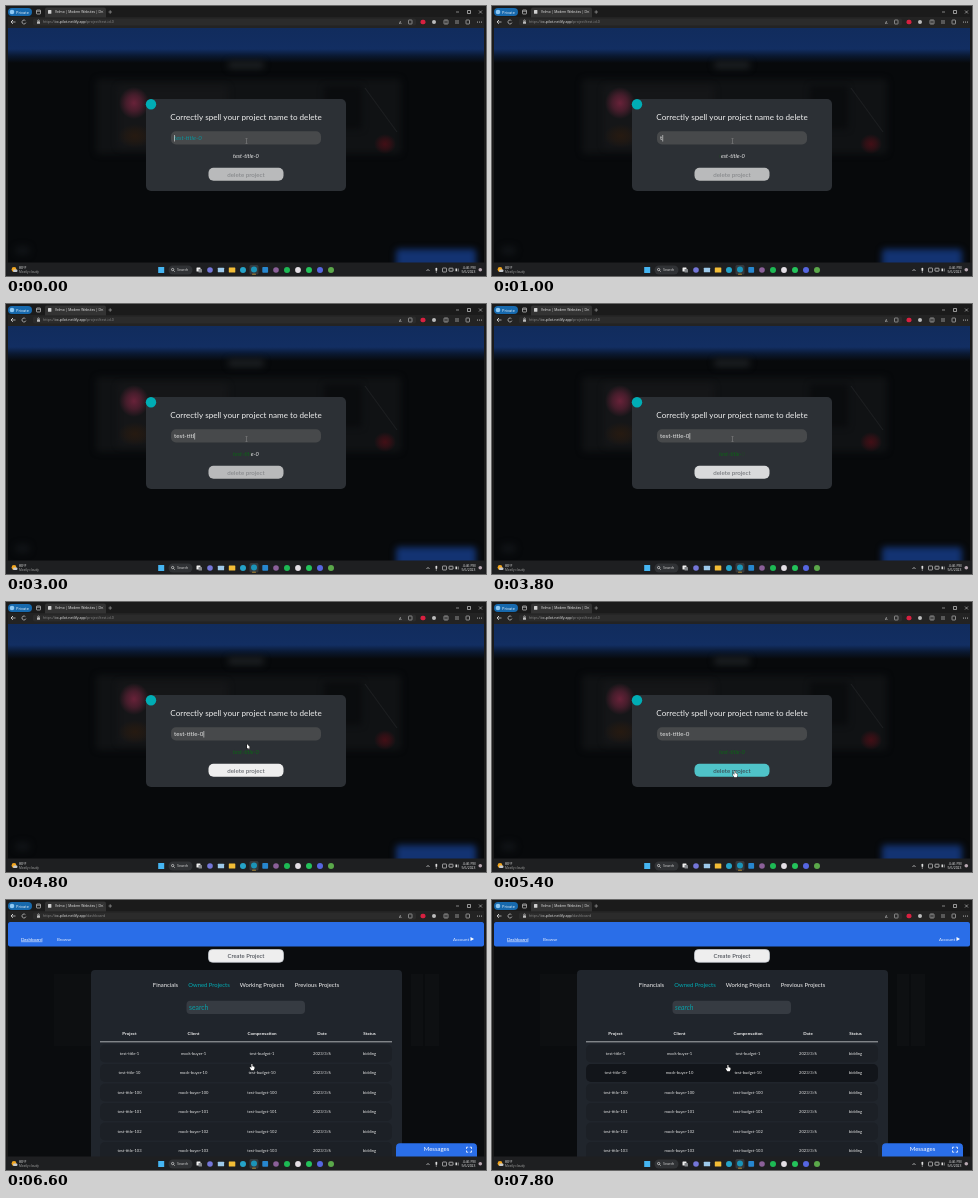
Write an HTML page with a canvas that moves like this. It is 480 px wide and 270 px high and loops after 8 s.

```html
<!DOCTYPE html>
<html lang="en">
<head>
<meta charset="utf-8">
<title>Project removal</title>
<style>
html, body { margin: 0; width: 100%; height: 100%; overflow: hidden; background: #08090b; }
canvas { display: block; width: 480px; height: 270px; }
</style>
</head>
<body>
<canvas id="stage"></canvas>
<script>
const canvas = document.getElementById('stage');
const ratio = window.devicePixelRatio || 1;
canvas.width = 480 * ratio;
canvas.height = 270 * ratio;
const c = canvas.getContext('2d');

const LOOP = 8000, STEP = 200;
const TEAL = '#00adb5', BLUE = '#2a6ee8', FRAME = '#1b1b1b';
const FONT = 'Lato, "Open Sans", sans-serif';
const UI = '"Open Sans", "Noto Sans", sans-serif';
const NAME = 'test-title-0';
const KEYS = [1000, 1400, 1600, 2000, 2200, 2400, 2600, 2800, 3000, 3400, 3600, 3800];
const PATH = [[0, 240.5, 135], [4200, 240.5, 135], [4800, 241, 142], [5400, 243, 171], [6400, 243, 171.5],
  [6600, 246, 166], [7000, 246, 166], [7800, 236, 167]];

const clamp = v => Math.max(0, Math.min(1, v));
const ramp = (t, a, b) => clamp((t - a) / (b - a));

function mix(a, b, k) {
  return 'rgb(' + a.map((v, i) => Math.round(v + (b[i] - v) * k)).join(',') + ')';
}

function rect(x, y, w, h, color, r = 0) {
  c.fillStyle = color;
  c.beginPath();
  c.roundRect(x, y, w, h, r);
  c.fill();
}

function dot(x, y, r, color) {
  c.fillStyle = color;
  c.beginPath();
  c.arc(x, y, r, 0, 7);
  c.fill();
}

function line(points, color, w = 0.7) {
  c.strokeStyle = color;
  c.lineWidth = w;
  c.beginPath();
  points.forEach(([x, y], i) => i ? c.lineTo(x, y) : c.moveTo(x, y));
  c.stroke();
}

function box(x, y, w, h, color, r = 0.5) {
  c.strokeStyle = color;
  c.lineWidth = 0.7;
  c.beginPath();
  c.roundRect(x, y, w, h, r);
  c.stroke();
}

function text(s, x, y, size, color, align = 'left', style = '', face = FONT) {
  c.font = `${style} ${size}px ${face}`;
  c.textAlign = align;
  c.fillStyle = color;
  c.fillText(s, x, y);
  return c.measureText(s).width;
}

function glow(x, y, rx, ry, color) {
  c.save();
  c.translate(x, y);
  c.scale(rx, ry);
  const g = c.createRadialGradient(0, 0, 0, 0, 0, 1);
  g.addColorStop(0, `rgba(${color},1)`);
  g.addColorStop(0.5, `rgba(${color},.6)`);
  g.addColorStop(1, `rgba(${color},0)`);
  c.fillStyle = g;
  c.fillRect(-1, -1, 2, 2);
  c.restore();
}

function blurred(radius, paint) {
  c.save();
  c.filter = `blur(${radius * ratio}px)`;
  paint();
  c.restore();
}

function browser(path) {
  rect(0, 0, 480, 22, '#232323');
  rect(0, 0, 480, 11, FRAME);
  rect(0, 11, 2, 246, FRAME);
  rect(478, 11, 2, 246, FRAME);
  rect(2, 2, 24, 8, '#1769ad', 4);
  dot(6, 6, 2.3, '#8cc8f4');
  text('Private', 10, 7.6, 4, '#e8f2fa', 'left', '', UI);
  box(30.5, 4, 4, 4, '#c8c8c8');
  line([[30.5, 5.2], [34.5, 5.2]], '#c8c8c8');
  rect(39, 1.5, 61, 10, '#333', [2, 2, 0, 0]);
  rect(42, 4, 3.4, 3.8, '#d0d0d0', 0.5);
  text('Velmo | Modern Websites | D', 49, 7.3, 3.3, '#f0f0f0', 'left', '', UI);
  line([[95, 4.8], [97, 6.8]], '#ccc', 0.5);
  line([[97, 4.8], [95, 6.8]], '#ccc', 0.5);
  line([[102.5, 6], [106, 6]], '#aaa', 0.6);
  line([[104.2, 4.2], [104.2, 7.8]], '#aaa', 0.6);
  line([[450, 6], [453, 6]], '#ccc', 0.6);
  box(461.5, 4.5, 3, 3, '#ccc', 0);
  line([[473, 4.5], [476, 7.5]], '#ccc', 0.6);
  line([[476, 4.5], [473, 7.5]], '#ccc', 0.6);

  line([[9.5, 16], [5, 16], [7, 14], [5, 16], [7, 18]], '#ddd');
  c.strokeStyle = '#ccc';
  c.beginPath();
  c.arc(18, 16, 2, 0.3, 5.5);
  c.stroke();
  rect(27, 12.5, 383, 7, '#2b2b2b', 2);
  rect(31, 15.4, 3, 2.4, '#bbb', 0.4);
  box(31.7, 13.9, 1.6, 1.8, '#bbb', 0.7);
  const a = text('https://', 37, 17.4, 3.6, '#8c8c8c', 'left', '', UI);
  const b = text('cc-pilot.netlify.app', 37 + a, 17.4, 3.6, '#f0f0f0', 'left', '', UI);
  text(path, 37 + a + b, 17.4, 3.6, '#8c8c8c', 'left', '', UI);
  text('A', 393, 17.6, 4, '#bbb', 'left', '', UI);
  box(402.5, 14, 3.5, 4, '#aaa');
  rect(414.5, 13.7, 5, 4.5, '#d82040', 2);
  dot(428, 16, 2, '#bbb');
  box(438, 14, 4, 4, '#bbb');
  line([[440, 14], [440, 18]], '#bbb', 0.5);
  line([[449, 15], [453, 15]], '#bbb');
  line([[449, 17], [453, 17]], '#bbb');
  box(460, 14, 3.5, 4, '#bbb');
  [471.5, 473.5, 475.5].forEach(x => dot(x, 16, 0.55, '#ccc'));
}

function taskbar() {
  rect(0, 256.5, 480, 13.5, '#1e1f21');
  dot(8, 263.5, 2.4, '#f2a51d');
  rect(7, 263.5, 4.5, 2.4, '#c5c9cf', 1.2);
  text('80°F', 13, 263, 3.5, '#eee', 'left', '', UI);
  text('Mostly cloudy', 13, 267.2, 3.1, '#aaa', 'left', '', UI);
  rect(152.2, 261, 6, 6, '#45b5f2');
  rect(162.5, 259.5, 24, 9, '#303235', 4.5);
  box(165.5, 262.4, 2.3, 2.3, '#ddd', 1.2);
  line([[167.6, 264.5], [168.7, 265.7]], '#ddd');
  text('Search', 171, 265.3, 3.6, '#ddd', 'left', '', UI);
  rect(190.5, 261.5, 4, 4, '#f0f0f0', 0.5);
  rect(192.5, 263, 3.5, 3.5, '#85888c', 0.5);
  dot(204, 264, 2.8, '#7476d8');
  rect(211.8, 261.8, 6.3, 4.5, '#9dc9ea', 0.5);
  rect(222.8, 261.5, 6.5, 5, '#f3bd36', 0.6);
  dot(237, 264, 3, '#25a3c8');
  rect(243.5, 259, 9, 9.5, '#34393d', 1.5);
  dot(248, 263.6, 3, '#1b94b8');
  rect(246, 267.8, 4, 0.8, '#e0ad38', 0.4);
  rect(256.3, 261, 5.8, 5.8, '#2787cf', 0.8);
  dot(270, 264, 2.8, '#8b6099');
  dot(281, 264, 3, '#1db954');
  dot(292, 264, 2.9, '#e4dfe5');
  dot(303, 264, 3, '#24c35b');
  dot(314, 264, 3, '#5666e0');
  dot(325, 264, 3, '#5ba84a');
  line([[420.5, 265], [422, 263.4], [423.5, 265]], '#ddd');
  rect(429.5, 261.8, 1.7, 3.3, '#ddd', 0.8);
  line([[430.3, 265], [430.3, 267]], '#ddd', 0.5);
  box(436.5, 262, 4, 4, '#ccc');
  box(443, 262.2, 4, 3, '#ddd');
  rect(449.5, 262.5, 1.5, 2.8, '#ddd');
  line([[452.2, 262.5], [452.2, 265.5]], '#ddd', 0.6);
  text('4:46 PM', 469.5, 262.8, 3.4, '#eee', 'right', '', UI);
  text('5/6/2023', 469.5, 267.2, 3.4, '#eee', 'right', '', UI);
  dot(474.3, 263.8, 1.8, '#b9a9b3');
}

function backdrop() {
  rect(0, 21, 480, 236, '#07090b');
  const g = c.createLinearGradient(0, 22, 0, 57);
  g.addColorStop(0, '#112c5d');
  g.addColorStop(0.6, '#122e62');
  g.addColorStop(0.8, '#0a1830');
  g.addColorStop(1, '#07090b');
  rect(2, 22, 476, 35, g);
  blurred(3, () => {
    rect(222, 55, 36, 8, '#1b1e21', 3);
    rect(90, 73, 305, 75, '#101214', 4);
    rect(112, 80, 110, 62, '#151618', 3);
    rect(318, 80, 38, 43, '#0a0c0e', 2);
    rect(9, 240, 15, 9, '#101316', 4);
    rect(390, 243, 80, 22, '#133372', 3);
  });
  glow(128, 97, 15, 16, '104,34,57');
  glow(129, 130, 17, 12, '38,26,17');
  glow(379, 138, 11, 10, '66,15,22');
  blurred(0.6, () => line([[359, 82], [391, 126]], '#1c1e20', 1.2));
}

function buttonColors(t) {
  if (t < 3800) return ['#b9babb', '#818386'];
  if (t < 5200) return t < 4000 ? ['#d9dadb', '#686b6f'] : ['#eeeeee', '#565a60'];
  const hover = ramp(t, 5000, 5600), press = ramp(t, 5800, 6200);
  if (press) return [mix([0, 173, 181], [24, 76, 83], press), mix([57, 62, 70], [30, 60, 67], press)];
  return [mix([238, 238, 238], [0, 173, 181], hover), '#393e46'];
}

function modal(t) {
  const typed = KEYS.filter(k => k <= t).length;
  rect(140, 93, 200, 92, '#2c3035', 5);
  dot(145, 98.3, 5.2, TEAL);
  text('Correctly spell your project name to delete', 240, 114.4, 8.1, '#f0f0f0', 'center');
  rect(165, 125.3, 150, 13.2, '#47494b', 5);
  let end = 168;
  if (typed) end += text(NAME.slice(0, typed), 168, 134.3, 6.2, '#e6e6e6');
  else text(NAME, 168, 134.3, 6.2, '#08959d', 'left', 'italic');
  const idle = typed ? t - KEYS[typed - 1] : t;
  if (t < 6000 && idle % 1000 < 500) line([[end + 0.5, 129], [end + 0.5, 135.5]], '#e8e8e8', 0.6);

  // Letters of the hint turn green as they are matched.
  c.font = `italic 5.8px ${FONT}`;
  const left = 240 - c.measureText(NAME).width / 2;
  [...NAME].forEach((ch, i) => {
    const x = left + c.measureText(NAME.slice(0, i)).width;
    const color = i < typed ? (t - KEYS[i] < STEP ? '#25402a' : '#0c6416') : '#e8e8e8';
    text(ch, x, 152.4, 5.8, color, 'left', 'italic');
  });

  const [fill, ink] = buttonColors(t);
  rect(202.5, 161.8, 75, 13, fill, 5);
  text('delete project', 240, 170.5, 6.2, ink, 'center');
}

function dashboard(t) {
  rect(0, 21, 480, 236, '#0a0c0e');
  rect(2, 22, 476, 24.5, BLUE, 2);
  const w = text('Dashboard', 15, 40.6, 4.5, '#fff');
  line([[15, 41.7], [15 + w, 41.7]], '#fff', 0.5);
  text('Browse', 51, 40.6, 4.4, '#e4edff');
  text('Account', 447, 40.6, 4.4, '#e4edff');
  c.fillStyle = '#fff';
  c.beginPath();
  c.moveTo(464.5, 37);
  c.lineTo(468, 39);
  c.lineTo(464.5, 41);
  c.fill();
  rect(48, 74, 38, 72, '#0d0f11');
  rect(405, 74, 12, 72, '#0e1012');
  rect(419, 74, 14, 72, '#0e1012');
  rect(202.5, 49.5, 75, 12.8, '#eeeeee', 4);
  box(202.5, 49.5, 75, 12.8, '#c9ced6', 4);
  text('Create Project', 240, 58, 5.9, '#393e46', 'center');

  rect(85, 70, 311, 187, '#20252c', [4, 4, 0, 0]);
  [['Financials', 159.5], ['Owned Projects', 203], ['Working Projects', 256], ['Previous Projects', 311]]
    .forEach(([s, x], i) => text(s, x, 87.4, 5.9, i === 1 ? TEAL : '#f0f0f0', 'center'));
  rect(180.5, 100.8, 118.5, 13.2, '#363b42', 4);
  text('search', 183, 109.8, 6.8, '#08a0a8', 'left', t < 7000 ? '' : 'italic');

  const cols = [123.5, 187.5, 256, 316, 363.5];
  ['Project', 'Client', 'Compensation', 'Date', 'Status']
    .forEach((s, i) => text(s, cols[i], 135, 4.5, '#f2f2f2', 'center', 'bold'));
  line([[94, 141.8], [386, 141.8]], '#b9bcc0', 0.9);
  const hover = ramp(t, 7000, 7600);
  [1, 10, 100, 101, 102, 103].forEach((n, i) => {
    const y = 153.5 + i * 19.5;
    rect(94, y - 9, 292, 18, i === 1 ? mix([28, 32, 38], [18, 21, 26], hover) : '#1c2026', 5);
    [`test-title-${n}`, `mock-buyer-${n}`, `test-budget-${n}`, '2023/3/6', 'bidding']
      .forEach((s, k) => text(s, cols[k], y + 1.3, 4.1, '#e6e6e6', 'center'));
  });

  rect(390, 243.2, 81, 14, BLUE, [4, 4, 0, 0]);
  text('Messages', 430.5, 251.4, 6, '#fff', 'center');
  [[-1, -1], [1, -1], [1, 1], [-1, 1]].forEach(([a, b]) => {
    const x = 463 + a * 2.5, y = 249.7 + b * 2.5;
    line([[x - a * 1.7, y], [x, y], [x, y - b * 1.7]], '#fff', 0.8);
  });
}

function pointer(t) {
  let i = 0;
  while (i < PATH.length - 2 && PATH[i + 1][0] <= t) i++;
  const [a, x0, y0] = PATH[i], [b, x1, y1] = PATH[i + 1];
  const k = ramp(t, a, b);
  const x = x0 + (x1 - x0) * k, y = y0 + (y1 - y0) * k;
  if (y < 138) {
    line([[x, y - 2.5], [x, y + 2.5]], '#858585', 0.6);
    line([[x - 1, y - 2.5], [x + 1, y - 2.5]], '#858585', 0.5);
    line([[x - 1, y + 2.5], [x + 1, y + 2.5]], '#858585', 0.5);
    return;
  }
  const hand = y > 161;
  const shape = hand
    ? [[-0.6, -2], [0.4, -2], [0.5, 0.3], [2.4, 0.8], [2.6, 2.2], [1.8, 4.2], [-0.7, 4.2], [-2.4, 1.6], [-1.8, 1], [-0.6, 1.8]]
    : [[0, 0], [0, 4.8], [1.1, 3.8], [1.9, 5.4], [2.6, 5], [1.9, 3.5], [3.4, 3.4]];
  c.beginPath();
  shape.forEach(([dx, dy], n) => n ? c.lineTo(x + dx, y + dy) : c.moveTo(x + dx, y + dy));
  c.closePath();
  c.strokeStyle = '#111';
  c.lineWidth = 0.9;
  c.stroke();
  c.fillStyle = '#fff';
  c.fill();
}

function draw(now) {
  const t = Math.floor((now % LOOP) / STEP) * STEP;
  const open = t < 6600;
  c.setTransform(ratio, 0, 0, ratio, 0, 0);
  if (open) {
    backdrop();
    modal(t);
  } else dashboard(t);
  browser(open ? '/project/test-id-0' : '/dashboard');
  taskbar();
  pointer(t);
  requestAnimationFrame(draw);
}
requestAnimationFrame(draw);
</script>
</body>
</html>
```
